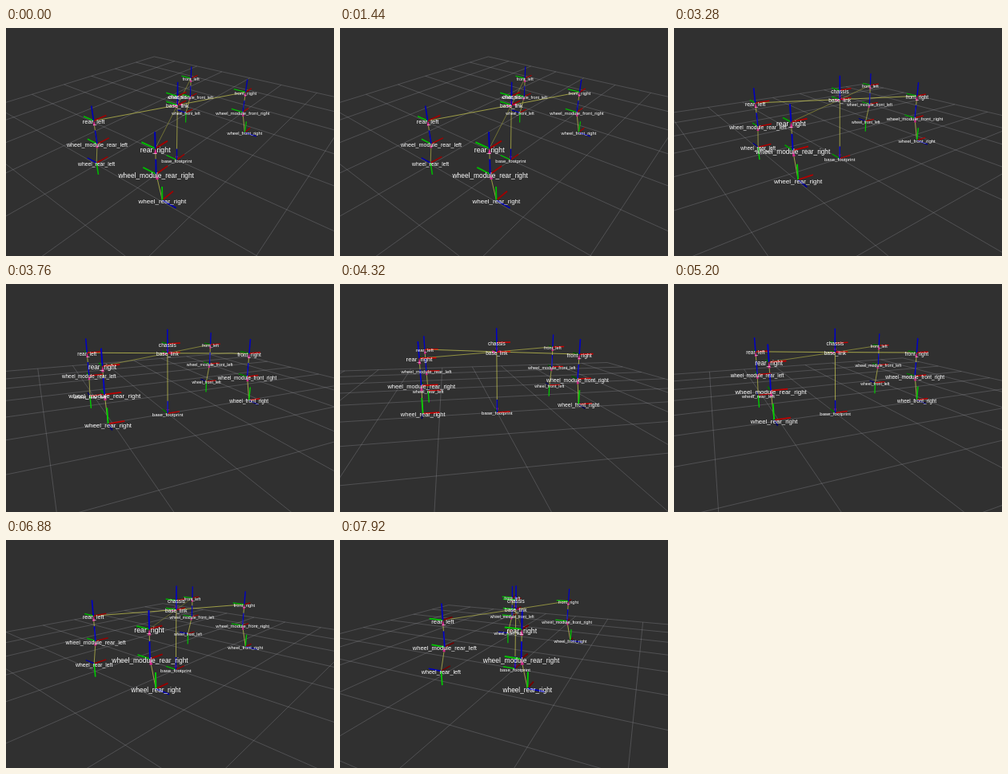
Write an HTML page with a canvas that moves like this. It is 410 by 286 pixels and loops after 8000 ms.

```html
<!DOCTYPE html>
<html lang="en">
<head>
<meta charset="utf-8">
<title>Robot frames</title>
<style>
  html, body { margin: 0; width: 100%; height: 100%; overflow: hidden; background: #303030; }
  canvas { display: block; width: 410px; height: 286px; }
</style>
</head>
<body>
<canvas id="stage" width="410" height="286"></canvas>
<script>
const ctx = document.getElementById('stage').getContext('2d');
const LOOP = 8000, STEP = 80;
const FOCAL = 365, DISTANCE = 407, NEAR = 8;
const PIVOT = [14.3, 22.3, 12.9];
const CELL = 74.5, HALF_CELLS = 5, AXIS = 17.5;
const RED = [205, 0, 0], GREEN = [0, 215, 0], BLUE = [0, 0, 205], YELLOW = [215, 215, 85];
const GRID = 'rgba(160,160,164,.45)';

// Orbit camera: time in ms, yaw and pitch in degrees
const ORBIT = [
  [0, -141, 31.1], [1960, -141, 31.1], [2480, -127.7, 30.5], [3280, -126.3, 22.1],
  [4320, -101.1, 15.6], [5920, -127.8, 17.3], [6880, -138.3, 19.3], [8000, -155, 19.3]
];

const UPRIGHT = [[1, 0, 0], [0, 1, 0], [0, 0, 1]];
const frames = {};
function addFrame(name, pos, parent, axes = UPRIGHT) {
  frames[name] = { name, pos, parent, axes };
}

addFrame('base_footprint', [0, 0, 0]);
addFrame('base_link', [0, 0, 80], 'base_footprint');
addFrame('chassis', [0, 0, 91.5], 'base_link');
for (const [end, x] of [['front', 90], ['rear', -90]]) {
  for (const [side, s] of [['left', 1], ['right', -1]]) {
    const corner = end + '_' + side;
    addFrame(corner, [x, s * 44.4, 80.2], 'base_link');
    addFrame('wheel_module_' + corner, [x, s * 44.4, 50.8], corner);
    addFrame('wheel_' + corner, [x, s * 51.6, 21.3], 'wheel_module_' + corner,
      [[1, 0, 0], [0, 0, -s], [0, s, 0]]);
  }
}
const allFrames = Object.values(frames);

function slope(i, k) {
  if (i === 0 || i === ORBIT.length - 1) return 0;
  const rate = j => (ORBIT[j + 1][k] - ORBIT[j][k]) / (ORBIT[j + 1][0] - ORBIT[j][0]);
  const a = rate(i - 1), b = rate(i);
  return a * b > 0 ? 2 * a * b / (a + b) : 0;
}

// Monotone cubic interpolation
function orbitAt(t, k) {
  let i = 0;
  while (i < ORBIT.length - 2 && t >= ORBIT[i + 1][0]) i++;
  const p = ORBIT[i], q = ORBIT[i + 1], d = q[0] - p[0], u = (t - p[0]) / d;
  const ease = u * u * (3 - 2 * u);
  return p[k] + (q[k] - p[k]) * ease +
    d * u * (1 - u) * ((1 - u) * slope(i, k) - u * slope(i + 1, k));
}

let cam;
function setCamera(t) {
  const yaw = orbitAt(t, 1) * Math.PI / 180, pitch = orbitAt(t, 2) * Math.PI / 180;
  cam = { cy: Math.cos(yaw), sy: Math.sin(yaw), cp: Math.cos(pitch), sp: Math.sin(pitch) };
}

function view(p) {
  const x = p[0] - PIVOT[0], y = p[1] - PIVOT[1], z = p[2] - PIVOT[2];
  const ahead = -cam.cy * x - cam.sy * y;
  return [
    -cam.sy * x + cam.cy * y,
    ahead * cam.sp + z * cam.cp,
    DISTANCE + ahead * cam.cp - z * cam.sp
  ];
}

function project(v) {
  const scale = FOCAL / v[2];
  return { x: 205.6 + v[0] * scale, y: 143 - v[1] * scale, scale };
}

const mix = (a, b, u) => a.map((n, i) => n + (b[i] - n) * u);
const distance = (a, b) => Math.hypot(...a.map((n, i) => n - b[i]));

// Rods seen end-on catch less light
function shade(color, from, to, ambient) {
  const toward = (view(to)[2] - view(from)[2]) / distance(from, to);
  const light = ambient + (1 - ambient) * Math.sqrt(Math.max(0, 1 - toward * toward));
  return `rgb(${color.map(n => Math.round(n * light))})`;
}

function line(from, to, color, width) {
  let a = view(from), b = view(to);
  if (a[2] < NEAR && b[2] < NEAR) return;
  if (a[2] < NEAR) a = mix(a, b, (NEAR - a[2]) / (b[2] - a[2]));
  if (b[2] < NEAR) b = mix(b, a, (NEAR - b[2]) / (a[2] - b[2]));
  const p = project(a), q = project(b);
  ctx.strokeStyle = color;
  ctx.lineWidth = width;
  ctx.beginPath();
  ctx.moveTo(p.x, p.y);
  ctx.lineTo(q.x, q.y);
  ctx.stroke();
}

function drawGrid() {
  const edge = CELL * HALF_CELLS;
  for (let i = -HALF_CELLS; i <= HALF_CELLS; i++) {
    const c = i * CELL;
    line([c, -edge, 0], [c, edge, 0], GRID, 0.65);
    line([-edge, c, 0], [edge, c, 0], GRID, 0.65);
  }
}

function drawLink(frame) {
  if (!frame.parent) return;
  const end = frames[frame.parent].pos, length = distance(end, frame.pos);
  const neck = mix(end, frame.pos, Math.min(6, length * 0.4) / length);
  line(frame.pos, neck, shade(YELLOW, frame.pos, end, 0.25), 0.7);

  const a = project(view(neck)), b = project(view(end));
  const dx = b.x - a.x, dy = b.y - a.y, d = Math.hypot(dx, dy) || 1;
  const w = 1.5 * a.scale / d;
  ctx.fillStyle = '#d8288c';
  ctx.beginPath();
  ctx.moveTo(b.x, b.y);
  ctx.lineTo(a.x - dy * w, a.y + dx * w);
  ctx.lineTo(a.x + dy * w, a.y - dx * w);
  ctx.fill();
}

function drawAxes(frame) {
  const width = 1.5 * project(view(frame.pos)).scale;
  const arms = frame.axes.map((dir, i) => {
    const tip = frame.pos.map((n, k) => n + dir[k] * AXIS);
    return { tip, depth: view(tip)[2], color: shade([RED, GREEN, BLUE][i], frame.pos, tip, 0.1) };
  });
  arms.sort((a, b) => b.depth - a.depth);
  for (const arm of arms) line(frame.pos, arm.tip, arm.color, width);
}

function drawLabel(frame) {
  const p = project(view(frame.pos)), size = 6.47 * p.scale;
  ctx.font = `${size}px "Liberation Sans", Arial, sans-serif`;
  ctx.fillText(frame.name, p.x, p.y + size * 0.54);
}

function draw(t) {
  setCamera(t);
  ctx.fillStyle = '#303030';
  ctx.fillRect(0, 0, 410, 286);
  drawGrid();
  const sorted = [...allFrames].sort((a, b) => view(b.pos)[2] - view(a.pos)[2]);
  sorted.forEach(drawLink);
  sorted.forEach(drawAxes);
  ctx.fillStyle = '#fff';
  ctx.textAlign = 'center';
  sorted.forEach(drawLabel);
}

const start = performance.now();
function tick() {
  const t = (performance.now() - start) % LOOP;
  draw(Math.floor(t / STEP) * STEP);
  requestAnimationFrame(tick);
}
tick();
</script>
</body>
</html>
```
